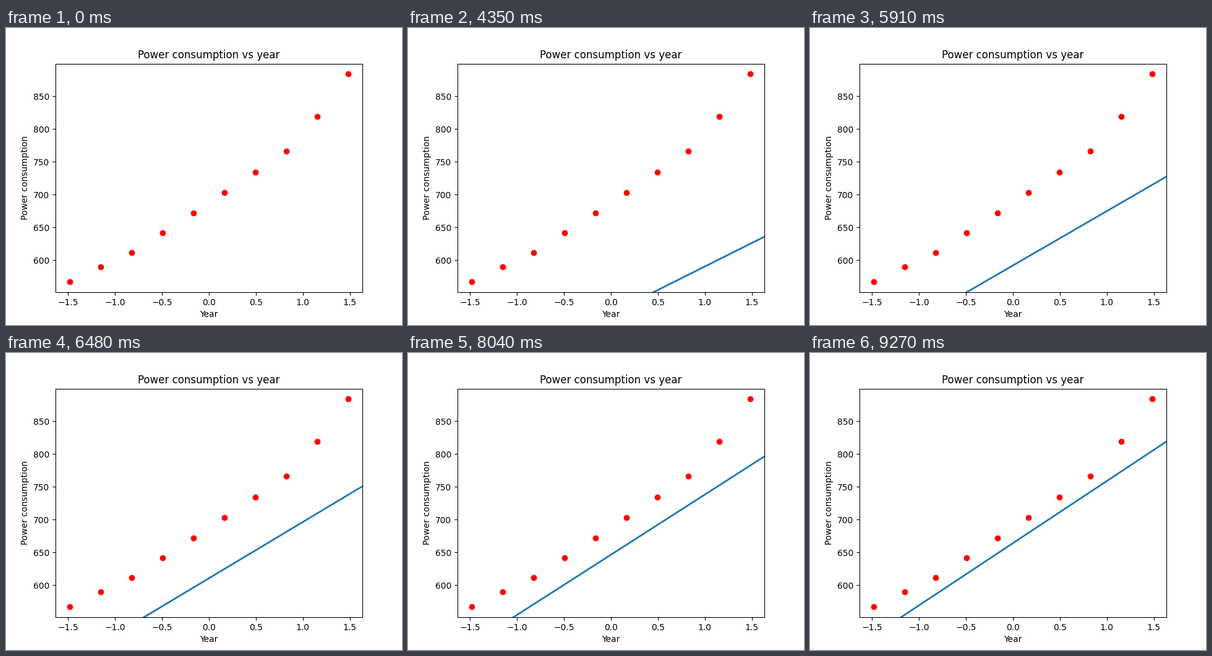
A matplotlib script for the animation above (9.3 s loop, 640 px wide and 480 px high).

```python
import numpy as np
import matplotlib.pyplot as plt
from matplotlib.animation import FuncAnimation

FRAMES = 310
INTERVAL = 30
RATE = 0.01
HOLD = 10  # frames before the descent starts

# Standardised years and the consumption for each
years = np.arange(10)
x = (years - years.mean()) / years.std(ddof=1)
y = np.array([567, 590, 611.7, 642, 672, 703, 734, 766, 819, 884])

# Least-squares solution that gradient descent approaches from zero
curvature = np.mean(x * x)
best_intercept = y.mean()
best_slope = np.mean(x * y) / curvature

fig, ax = plt.subplots(figsize=(6.4, 4.8), dpi=100)
ax.plot(x, y, "o", color="red")
ax.set_title("Power consumption vs year")
ax.set_xlabel("Year")
ax.set_ylabel("Power consumption")
ax.set_xlim(ax.get_xlim())
ax.set_ylim(ax.get_ylim())

line_x = np.array([-2.0, 2.0])
line, = ax.plot(line_x, 0 * line_x, lw=2, color="#1f77b4")


def fit(step):
    """Intercept and slope after a number of descent steps."""
    intercept = best_intercept * (1 - (1 - RATE) ** step)
    slope = best_slope * (1 - (1 - RATE * curvature) ** step)
    return intercept, slope


def update(frame):
    intercept, slope = fit(max(frame - HOLD, 0))
    line.set_ydata(intercept + slope * line_x)
    return line,


anim = FuncAnimation(fig, update, frames=FRAMES, interval=INTERVAL,
                     repeat=True, repeat_delay=0)
plt.show()
```
